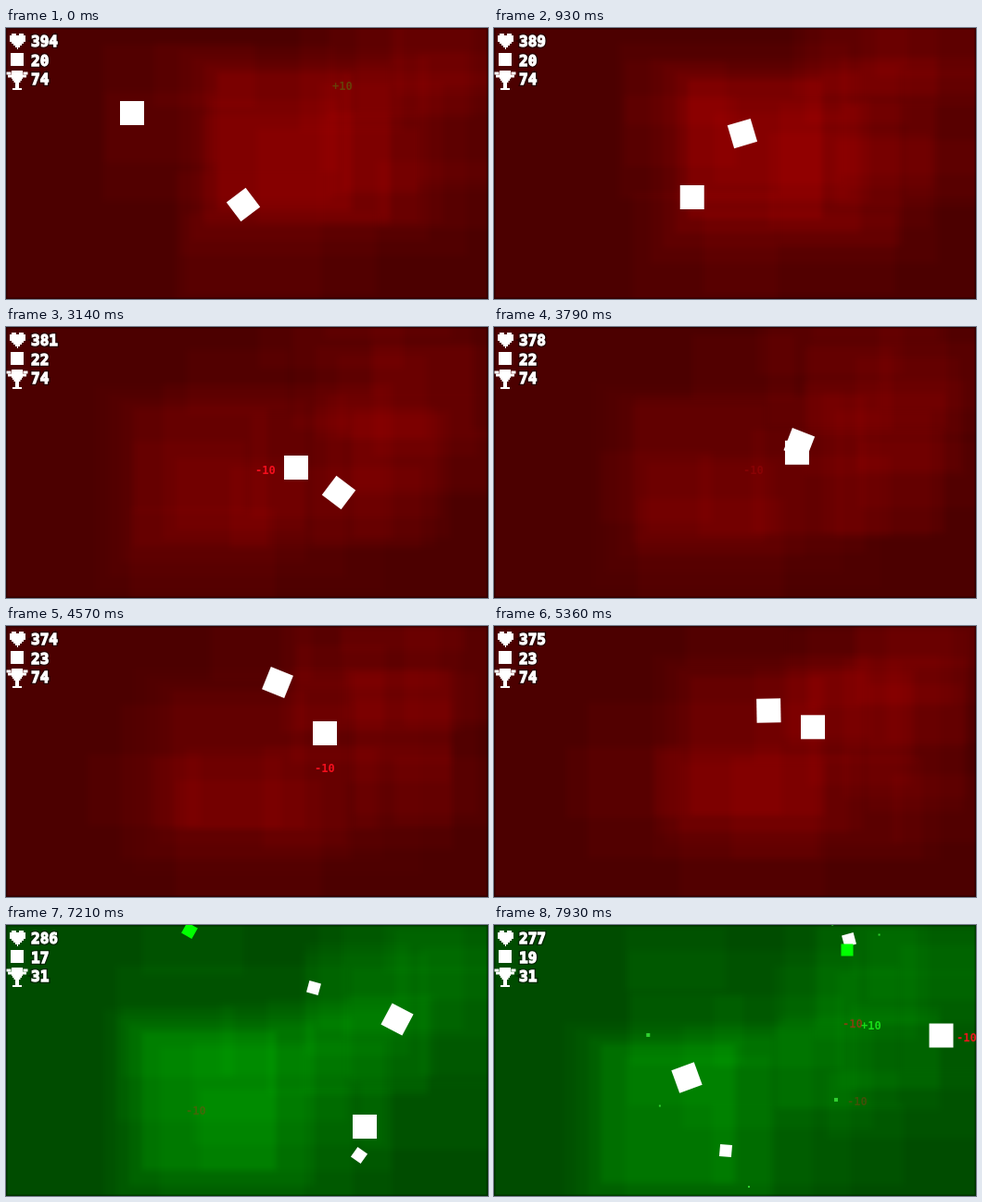
Write an HTML page with a canvas that moves like this. It is 520x293 px and loops after 8 s.

```html
<!DOCTYPE html>
<html lang="en">
<head>
<meta charset="utf-8">
<title>Square arcade</title>
<style>
  html, body { margin: 0; width: 100%; height: 100%; overflow: hidden; background: #400; }
  canvas { display: block; width: 100vw; height: 100vh; }
</style>
</head>
<body>
<canvas width="520" height="293"></canvas>
<script>
const W = 520, H = 293, LOOP = 8000, TICKS = 112, CUT = 94;
const ctx = document.querySelector('canvas').getContext('2d');

// Poses: tick, life, player x y, spinner x y angle. Popups: tick, x, y, amount.
const redScene = {
  shade: v => `rgb(${v},0,0)`,
  glowShift: [0, 0],
  best: 74,
  count: tick => 20 + Math.floor(tick / 21),
  poses: [
    [0, 394, 136, 92, 256, 191, -37],
    [24, 385, 279.5, 260, 278, 49, 167],
    [44, 381, 313, 152, 359, 179, 307],
    [64, 374, 344, 116, 293, 61, 472],
    [87, 376, 344, 102, 300, 125, 612]
  ],
  popups: [[-9, 352, 67, 10], [43, 269, 159, -10], [63, 333, 158, -10], [78, 332, 18, 20]],
  drifters: []
};

const greenScene = {
  shade: v => `rgb(0,${v},0)`,
  glowShift: [-60, 58],
  best: 31,
  count: tick => 17 + Math.max(0, Math.floor((tick - 101) / 5)),
  poses: [
    [101, 286, 387, 218, 422, 102, 28],
    [111, 277, 482.5, 119.5, 208, 165, 160]
  ],
  popups: [[92, 194, 205, -10], [102, 381, 195, -10], [105, 376, 111, -10],
    [108, 396, 113, 10], [110, 499, 126, -10]],
  // Position and velocity per tick, counted from the first pose
  drifters: [
    { x: 332, y: 68, vx: 5.1, vy: -5.2, angle: 15, color: '#fff' },
    { x: 381, y: 249, vx: -13.1, vy: -.5, angle: 35, color: '#fff' },
    { x: 198, y: 6, vx: 18.3, vy: 2.1, angle: 30, color: '#0f0' }
  ]
};

function random(seed) {
  const n = Math.sin(seed * 127.1 + 11.7) * 43758.5453;
  return n - Math.floor(n);
}

// Straight motion between poses, carried on past the first and last one
function poseAt(poses, tick) {
  const next = poses.findIndex(pose => pose[0] > tick);
  const i = next < 0 ? poses.length - 1 : Math.max(1, next);
  const a = poses[i - 1], b = poses[i];
  const p = (tick - a[0]) / (b[0] - a[0]);
  return a.slice(1).map((v, k) => v + (b[k + 1] - v) * p);
}

function square(x, y, size, degrees, color) {
  ctx.save();
  ctx.translate(x, y);
  ctx.rotate(degrees * Math.PI / 180);
  ctx.fillStyle = color;
  ctx.fillRect(-size / 2, -size / 2, size, size);
  ctx.restore();
}

function centredBlock(x, y, w, h) {
  ctx.fillRect(x - w / 2, y - h / 2, w, h);
}

function drawBackdrop({ shade, glowShift }, tick) {
  ctx.fillStyle = shade(76);
  ctx.fillRect(0, 0, W, H);

  ctx.save();
  ctx.globalCompositeOperation = 'lighter';
  ctx.filter = 'blur(3px)';

  // A pulsing glow of nested blocks sways around the stage
  const turn = tick * 2 * Math.PI / 87;
  const x = 255 + 45 * Math.cos(turn) + glowShift[0];
  const y = 143 - 20 * Math.cos(turn) + glowShift[1];
  const light = 18 + 8 * Math.cos(turn - .9);
  for (let i = 0; i < 4; i++) {
    ctx.fillStyle = shade(Math.round(light / (i + 1.6)));
    centredBlock(x + i * 14, y + i * 4, 145 + i * 55, 150 + i * 24);
  }

  // Faint blocks drift behind it, mostly to the right
  ctx.fillStyle = shade(6);
  for (let i = 0; i < 18; i++) {
    centredBlock(
      150 + 350 * random(i) + 40 * Math.sin(tick / 15 + i * 2),
      H * random(i + 60) + 35 * Math.cos(tick / 19 + i),
      80 + 170 * random(i + 20),
      60 + 110 * random(i + 40));
  }
  ctx.restore();

  ctx.strokeStyle = 'rgba(0,0,0,.35)';
  ctx.lineWidth = 3;
  ctx.strokeRect(0, 0, W, H);
}

function drawSparks(tick) {
  const age = tick - 104;
  if (age < 0) return;
  ctx.fillStyle = '#30d030';
  for (let i = 0; i < 6; i++) {
    const angle = i * Math.PI / 3 + random(i), reach = age * (8 + 16 * random(i + 9));
    const size = i % 3 ? 2 : 4;
    centredBlock(300 + reach * Math.cos(angle), 130 + reach * Math.sin(angle), size, size);
  }
}

function drawPopups(popups, tick) {
  ctx.font = 'bold 12px "DejaVu Sans Mono", monospace';
  for (const [at, x, y, amount] of popups) {
    const age = tick - at;
    if (age < 0 || age > 12) continue;
    ctx.globalAlpha = 1 - age / 12;
    ctx.fillStyle = amount > 0 ? '#20ff20' : '#ff1020';
    ctx.fillText((amount > 0 ? '+' : '') + amount, x, y);
  }
  ctx.globalAlpha = 1;
}

function drawHeart() {
  ctx.fillRect(6, 6, 5, 2);
  ctx.fillRect(14, 6, 5, 2);
  ctx.fillRect(4, 8, 17, 7);
  for (let i = 0; i < 4; i++) ctx.fillRect(6 + 2 * i, 15 + 2 * i, 13 - 4 * i, 2);
}

function drawTrophy() {
  ctx.fillRect(6, 46, 12, 9);
  for (let i = 0; i < 3; i++) centredBlock(12, 56 + 2 * i, 10 - 3 * i, 2);
  ctx.fillRect(10, 60, 4, 5);
  ctx.fillRect(7, 65, 10, 2);
  for (const side of [-1, 1]) {
    centredBlock(12 + side * 9, 49, 5, 3);
    centredBlock(12 + side * 8, 52, 4, 3);
  }
}

function hudNumber(value, y) {
  ctx.strokeStyle = 'rgba(0,0,0,.5)';
  ctx.lineWidth = 4;
  ctx.strokeText(value, 27, y);
  ctx.strokeStyle = '#fff';
  ctx.lineWidth = 1.3;
  ctx.strokeText(value, 27, y);
  ctx.fillText(value, 27, y);
}

function drawHud(values) {
  ctx.fillStyle = '#fff';
  drawHeart();
  ctx.fillRect(5, 27, 14, 14);
  drawTrophy();
  ctx.font = 'bold 16px "DejaVu Sans Mono", monospace';
  values.forEach((value, row) => hudNumber(value, 20 + row * 20.5));
}

function draw(now) {
  const tick = Math.floor((now % LOOP + 5) / LOOP * TICKS) % TICKS;
  const scene = tick < CUT ? redScene : greenScene;
  const [life, px, py, sx, sy, angle] = poseAt(scene.poses, tick);

  drawBackdrop(scene, tick);
  drawSparks(tick);
  drawPopups(scene.popups, tick);
  for (const d of scene.drifters) {
    const age = tick - scene.poses[0][0];
    square(d.x + d.vx * age, d.y + d.vy * age, 13, d.angle + 6 * age, d.color);
  }
  square(sx, sy, 26, angle, '#fff');
  square(px, py, 26, 0, '#fff');
  drawHud([Math.round(life), scene.count(tick), scene.best]);
}

const start = performance.now();
function loop() {
  draw(performance.now() - start);
  requestAnimationFrame(loop);
}
loop();
</script>
</body>
</html>
```
